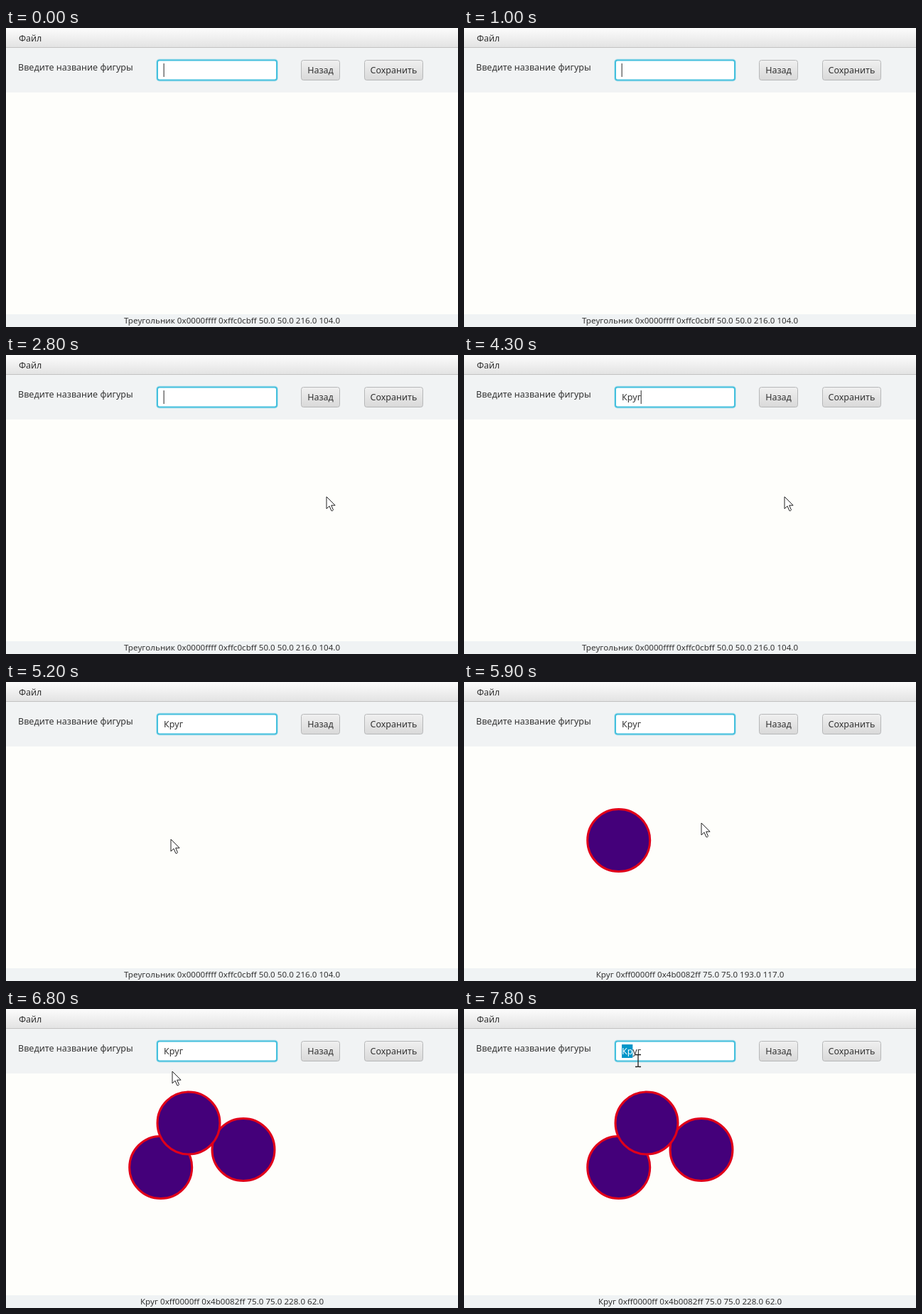
Animation, 636 px wide and 422 px high, one loop 8 s. Source, as an HTML page:

```html
<!DOCTYPE html>
<html lang="ru">
<head>
<meta charset="utf-8">
<title>Фигуры</title>
<style>
html, body { margin: 0; width: 100%; height: 100%; overflow: hidden; background: #fefefb; }
svg { display: block; }
text { font: 12.5px "Noto Sans", "Open Sans", sans-serif; fill: #333; }
#status { font-size: 11.6px; }
#status, .mid { text-anchor: middle; }
.btn { fill: url(#face); stroke: #b6b7b8; }
#shapes circle { r: 44px; fill: #44007a; stroke: #e0001a; stroke-width: 3; }
</style>
</head>
<body>
<svg width="636" height="422" viewBox="0 0 636 422">
  <defs>
    <linearGradient id="bar" x2="0" y2="1">
      <stop offset="0" stop-color="#fcfcfc"/>
      <stop offset=".45" stop-color="#f1f1f1"/>
      <stop offset="1" stop-color="#e3e3e3"/>
    </linearGradient>
    <linearGradient id="face" x2="0" y2="1">
      <stop offset="0" stop-color="#f0f0f0"/>
      <stop offset="1" stop-color="#d9d9d9"/>
    </linearGradient>
  </defs>
  <rect width="636" height="422" fill="#fefefb"/>
  <rect width="636" height="91" fill="#f1f3f4"/>
  <rect width="636" height="27" fill="url(#bar)"/>
  <rect y="27" width="636" height="1" fill="#c2c2c2"/>
  <rect y="404" width="636" height="18" fill="#f0f3f4"/>
  <text x="18" y="19">Файл</text>
  <text x="17" y="60">Введите название фигуры</text>
  <rect x="213" y="45.5" width="168" height="28" rx="3" fill="none" stroke="#45c0dd" stroke-opacity=".3" stroke-width="4"/>
  <rect x="213" y="45.5" width="168" height="28" rx="3" fill="#fff" stroke="#45c0dd" stroke-width="2"/>
  <rect class="btn" x="415.5" y="45.5" width="54" height="28" rx="3"/>
  <text class="mid" x="442.5" y="64">Назад</text>
  <rect class="btn" x="504.5" y="45.5" width="82" height="28" rx="3"/>
  <text class="mid" x="545.5" y="64">Сохранить</text>
  <rect id="mark" x="222" y="50" height="19" fill="#0096c9"/>
  <text x="222" y="64"><tspan id="picked" fill="#fff"></tspan><tspan id="typed"></tspan></text>
  <rect id="caret" y="50" width="1.4" height="19" fill="#666"/>
  <text id="status" x="318" y="417"></text>
  <g id="shapes"></g>
  <path id="arrow" d="M0 1V18L4 14.2L6.8 20.7Q8.1 21.8 9.5 19.7L6.7 13.2H12.1Z" fill="#fff" stroke="#222"/>
  <path id="beam" d="M-4 -8.5H-1Q0 -8.5 0 -7.5Q0 -8.5 1 -8.5H4M0 -7.5V7.5M-4 8.5H-1Q0 8.5 0 7.5Q0 8.5 1 8.5H4" fill="none" stroke="#222" stroke-width="1.3"/>
</svg>
<script>
const LOOP = 8000, STEP = 100, WORD = "Круг";
const BLINK = 1000, TYPE = 3400, RESUME = 4100, DRAG = 7100, RELEASE = 7300;
const $ = id => document.getElementById(id);

// Each move ends at (x, y); one with a drop time leaves a circle there.
const home = { x: 304, y: 173 };
const moves = [
  { from: 1600, to: 1700, x: 322, y: 171 },
  { from: 1700, to: 1900, x: 451, y: 199 },
  { from: 4900, to: 5300, x: 217.7, y: 223.5, drop: 5400, spot: "193.0 117.0" },
  { from: 5700, to: 5900, x: 334, y: 198.5, drop: 6000, spot: "296.0 95.0" },
  { from: 6100, to: 6300, x: 257, y: 161, drop: 6500, spot: "228.0 62.0" },
  { from: 6500, to: DRAG, x: 226, y: 63 },
  { from: DRAG, to: RELEASE, x: 245, y: 73 }
];
const drops = moves.filter(m => m.drop);

const clamp = (v, lo, hi) => Math.max(lo, Math.min(hi, v));
const easeOut = k => 1 - (1 - k) ** 2;
const show = (el, on) => el.setAttribute("visibility", on ? "visible" : "hidden");

for (const d of drops) {
  d.el = document.createElementNS("http://www.w3.org/2000/svg", "circle");
  d.el.setAttribute("cx", d.x);
  d.el.setAttribute("cy", d.y);
  $("shapes").append(d.el);
}

function pointer(t) {
  let { x, y } = home;
  for (const m of moves) {
    const k = easeOut(clamp((t - m.from) / (m.to - m.from), 0, 1));
    x += (m.x - x) * k;
    y += (m.y - y) * k;
  }
  return { x, y };
}

// First letter, a pause, then one letter per step.
function letters(t) {
  if (t < TYPE) return 0;
  return clamp(2 + Math.floor((t - RESUME) / STEP), 1, WORD.length);
}

// Every edit restarts the caret's blinking.
function caretOn(t) {
  const typedAll = RESUME + (WORD.length - 2) * STEP;
  let start = -300;
  if (t >= TYPE) start = TYPE;
  if (t >= RESUME) start = Math.min(t, typedAll);
  if (t >= DRAG) start = Math.min(t, RELEASE);
  return (t - start) % BLINK < BLINK / 2;
}

function draw(now) {
  const t = Math.floor((now % LOOP) / STEP) * STEP;
  const picked = clamp((t - DRAG) / STEP, 0, 2);

  $("picked").textContent = WORD.slice(0, picked);
  $("typed").textContent = WORD.slice(picked, letters(t));
  const markWidth = picked ? $("picked").getComputedTextLength() : 0;
  const textWidth = letters(t) ? $("typed").getComputedTextLength() : 0;
  $("mark").setAttribute("width", markWidth);
  $("caret").setAttribute("x", 221.5 + (t >= DRAG ? markWidth : textWidth));
  show($("caret"), caretOn(t));

  drops.forEach(d => show(d.el, t >= d.drop));
  const last = drops.filter(d => t >= d.drop).pop();
  $("status").textContent = last
    ? "Круг 0xff0000ff 0x4b0082ff 75.0 75.0 " + last.spot
    : "Треугольник 0x0000ffff 0xffc0cbff 50.0 50.0 216.0 104.0";

  const { x, y } = pointer(t), seen = t >= moves[0].from, inField = y < 74;
  show($("arrow"), seen && !inField);
  show($("beam"), seen && inField);
  $(inField ? "beam" : "arrow").setAttribute("transform", `translate(${Math.round(x)} ${Math.floor(y)})`);
}

function tick(now) {
  draw(now);
  requestAnimationFrame(tick);
}
draw(0);
requestAnimationFrame(tick);
</script>
</body>
</html>
```
